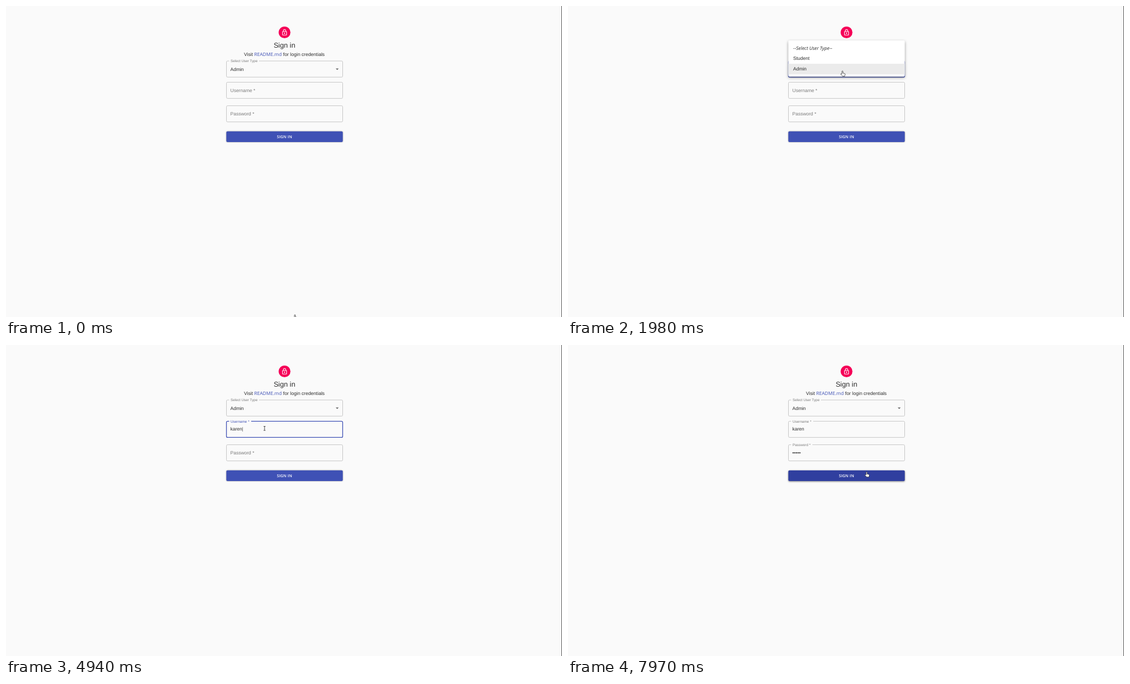
Write an HTML page that moves like this. It is 1000 by 560 pixels and loops after 8 s.

```html
<!DOCTYPE html>
<html lang="en">
<head>
<meta charset="utf-8">
<title>Sign in</title>
<style>
  html, body { margin: 0; height: 100%; overflow: hidden; background: #fafafa; }
  svg { display: block; width: 1000px; height: 560px; }
  text { font: 8.5px "Liberation Sans", Arial, sans-serif; fill: #2b2b2b; white-space: pre; text-rendering: geometricPrecision; }
  .alt { font-family: "Open Sans", "Noto Sans", sans-serif; }
  .menu { transform-origin: 501px 113px; filter: drop-shadow(0 2px 2.5px #0006); }
</style>
</head>
<body>
<svg id="stage" viewBox="0 0 1000 560"></svg>
<script>
const LOOP = 8000, LEFT = 396.5, RIGHT = 605.5, TALL = 29.1;
const BLUE = '#3f51b5', GREY = '#7a7a7a';
const TOP = { type: 99, user: 137.3, pass: 179.6, button: 225.7 };
const NAME = 'karen';
const stage = document.getElementById('stage');

// Moments of the story, in ms
const LOADED = 110, OPEN = 1690, CLOSE = 2500, CLICK = 3200, TAB = 5040, SUBMIT = 7640;
const HIDE = 5140, SHOW = 6800;
const nameKeys = [3800, 4000, 4200, 4400, 4600];
const passKeys = [5720, 5920, 6120, 6310, 6510];
const path = [
  [0, 519.5, 556], [110, 519.5, 556], [1200, 492, 117.5], [1500, 492, 117.5],
  [1700, 493.5, 117], [2650, 493.5, 117], [2950, 465, 150], [6800, 465, 150],
  [7150, 515, 190], [7550, 537, 228.5], [LOOP, 537, 228.5]
];

const mix = (a, b, p) => a + (b - a) * p;
const smooth = p => p * p * (3 - 2 * p);
const ramp = (t, start, span = 200) => smooth(Math.min(1, Math.max(0, (t - start) / span)));
const text = (x, y, s, attrs = '') => `<text x="${x}" y="${y}" ${attrs}>${s}</text>`;

function pointer(t) {
  const i = path.findIndex(k => k[0] > t);
  const [t0, x0, y0] = path[i - 1], [t1, x1, y1] = path[i];
  const p = smooth((t - t0) / (t1 - t0));
  return [mix(x0, x1, p), mix(y0, y1, p)];
}

function focusAt(t) {
  if (t < LOADED || t >= SUBMIT) return '';
  return t < OPEN ? 'user' : t < CLICK ? 'type' : t < TAB ? 'user' : 'pass';
}

function hoverAt([x, y]) {
  if (x < LEFT || x > RIGHT) return '';
  return Object.keys(TOP).find(k => y >= TOP[k] && y <= TOP[k] + (k === 'button' ? 19.3 : TALL)) || '';
}

function outline(y, state, notch, fill = 'none') {
  const [color, width] = { focus: [BLUE, 1.3], hover: ['#757575', 1], idle: ['#c6c6c6', 1] }[state];
  const start = notch ? 401.5 : 450, b = y + TALL;
  return `<path d="M${notch || 450} ${y}H${RIGHT - 2}q2 0 2 2V${b - 2}q0 2-2 2H${LEFT + 2}q-2 0-2-2V${y + 2}q0-2 2-2H${start}"
    fill="${fill}" stroke="${color}" stroke-width="${width}"/>`;
}

// Label that shrinks onto the border as p goes from 0 to 1
function label(y, s, p, focused) {
  return text(mix(403.5, 404, p), y + mix(17.8, 2.2, p), s,
    `style="font-size:${mix(8.5, 6.38, p)}px;fill:${focused ? BLUE : GREY}"`);
}

function value(t, y, s, focused, marks) {
  const last = Math.max(...marks.filter(m => m <= t));
  const caret = focused && (t - last) % 1000 < 500 ? '<tspan dx="-.5" fill="#555">|</tspan>' : '';
  return text(403.5, y + 17, s + caret);
}

function menu(t) {
  const p = ramp(t, OPEN, 230) * (1 - ramp(t, CLOSE));
  if (!p) return '';
  const grow = t < CLOSE ? p : 1;
  return `<g class="menu" opacity="${p}" style="transform:scale(${mix(.75, 1, grow)},${mix(.56, 1, grow)})">
    <rect x="396.3" y="62" width="209.4" height="65" rx="2" fill="#fff"/>
    <rect x="396.3" y="104" width="209.4" height="19" fill="#ebebeb"/>
    ${text(405, 78.6, '--Select User Type--', 'class="alt" font-style="italic" style="font-style:italic"')}
    ${text(405, 97.1, 'Student')}${text(405, 116.2, 'Admin')}</g>`;
}

function cursor(t, [x, y], over) {
  if (t >= HIDE && t < SHOW) return '';
  let shape;
  if (over === 'user' || over === 'pass')
    shape = '<path d="M-1.7-3.5H1.7M-1.7 3.8H1.7M0-3.5V3.8" fill="none" stroke="#333" stroke-width=".9"/>';
  else if (over || t < LOADED)
    shape = '<path d="M-.8 5.4V.8a.9.9 0 0 1 1.8 0V3.9l2.8.5q1.2.3 1.1 1.5L4.3 9.3H.3L-2.9 6q-.4-1.1.7-1z" fill="#fff" stroke="#333" stroke-width=".8"/>';
  else
    shape = '<path d="M0 0V8.5L2 6.7 3.3 9.6 4.6 9 3.3 6.2H6z" fill="#222" stroke="#fff" stroke-width=".5"/>';
  return `<g transform="translate(${x} ${y})">${shape}</g>`;
}

const header = `
  <rect width="1000" height="560" fill="#fafafa"/>
  <rect x="999" width="1" height="560" fill="#555"/>
  <circle cx="501" cy="47.5" r="10.6" fill="#f50057"/>
  <g fill="none" stroke="#fff" stroke-width="1.05">
    <rect x="497.3" y="45.9" width="7.4" height="6.4" rx=".6"/>
    <path d="M498.9 45.9V44.3a2.1 2.1 0 0 1 4.2 0V45.9"/>
  </g>
  <circle cx="501" cy="49.1" r="1.05" fill="#fff"/>
  ${text(500.8, 75.2, 'Sign in', 'text-anchor="middle" style="font-size:12.7px"')}
  ${text(428, 90, 'Visit', 'style="font-size:8.6px"')}
  ${text(446.5, 90, 'README.md', `class="alt" style="fill:${BLUE}"`)}
  ${text(498.6, 90, 'for login credentials', 'style="font-size:8.6px"')}`;

function button(hot) {
  const shadow = hot ? '0 1.5px 1.6px #0007' : '0 .7px .8px #0006';
  return `<rect x="396.3" y="${TOP.button}" width="209.4" height="19.2" rx="2" fill="${hot ? '#303f9f' : BLUE}"
    style="filter:drop-shadow(${shadow})"/>
    ${text(500.9, 238, 'SIGN IN', 'class="alt" text-anchor="middle" style="font-size:7px;font-weight:600;letter-spacing:.2px;fill:#fff"')}`;
}

function draw(t) {
  const pos = pointer(t), over = hoverAt(pos), focus = focusAt(t);
  const state = k => focus === k ? 'focus' : over === k ? 'hover' : 'idle';
  const typed = keys => keys.filter(k => k <= t).length;
  const userUp = ramp(t, LOADED) - ramp(t, OPEN) + ramp(t, CLICK);
  const passUp = ramp(t, TAB);
  const shaded = focus === 'type' ? '#ededed' : 'none';

  stage.innerHTML = header
    + outline(TOP.type, state('type'), 455, shaded)
    + label(TOP.type, 'Select User Type', 1, focus === 'type')
    + text(403.5, 117, 'Admin')
    + `<path d="M593 112.6h5.4l-2.7 2.7z" fill="#666"/>`
    + outline(TOP.user, state('user'), userUp > .3 && 441)
    + label(TOP.user, 'Username *', userUp, focus === 'user')
    + value(t, TOP.user, NAME.slice(0, typed(nameKeys)), focus === 'user', [LOADED, CLICK, ...nameKeys])
    + outline(TOP.pass, state('pass'), passUp > .3 && 439.5)
    + label(TOP.pass, 'Password *', passUp, focus === 'pass')
    + value(t, TOP.pass, '•'.repeat(typed(passKeys)), focus === 'pass', [TAB, ...passKeys])
    + button(over === 'button')
    + menu(t)
    + cursor(t, pos, over);
}

const began = performance.now();
function tick() {
  draw((performance.now() - began) % LOOP);
  requestAnimationFrame(tick);
}
tick();
</script>
</body>
</html>
```
